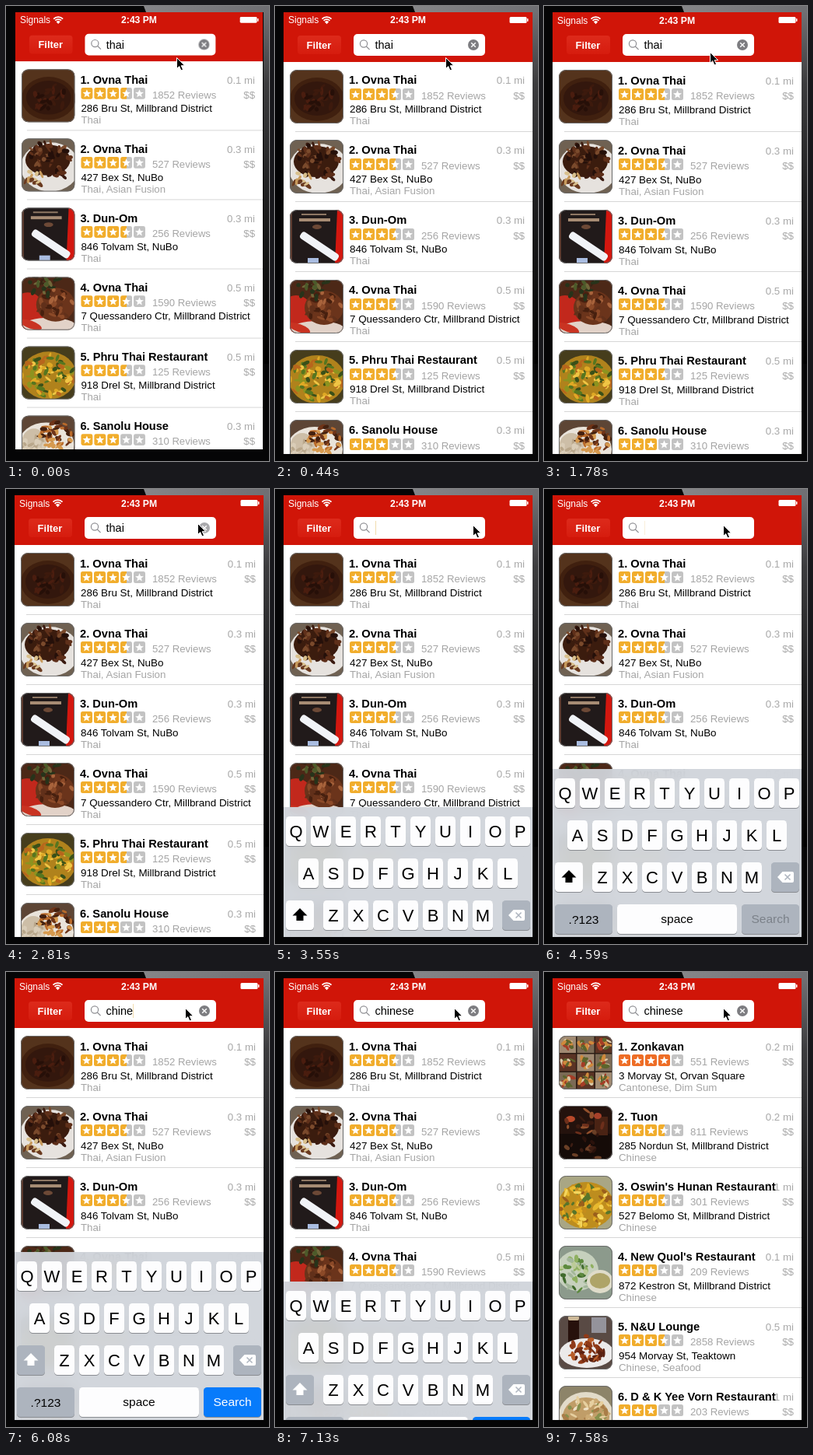
Recreate the animation shown at these times as an HTML page. Size 338 by 585 pixels, loop 8000 ms.

```html
<!DOCTYPE html>
<html lang="en">
<head>
<meta charset="utf-8">
<title>Restaurant search</title>
<style>
html, body { margin: 0; width: 100%; height: 100%; overflow: hidden; background: #000; }
svg { display: block; position: absolute; left: 0; top: 0; }
text, .query { font-family: "Liberation Sans", Arial, sans-serif; }
#stage { position: relative; width: 338px; height: 585px; overflow: hidden; background: #050506; }
#shine {
  position: absolute; inset: 0;
  clip-path: polygon(177px 0, 338px 0, 338px 460px, 331px 460px, 331px 8px, 180px 8px);
  background: linear-gradient(to bottom, transparent 8px, #0007 100px, #000b 250px, #000 460px),
    linear-gradient(to right, #858588 180px, #6f6f73 338px);
}
#screen {
  position: absolute; left: 11px; top: 8px; width: 320px; height: 568px;
  overflow: hidden; background: #fff; transform-origin: 160px 0;
}
#keys {
  position: absolute; left: 0; top: 352px; width: 320px; height: 216px;
  background: rgba(208, 212, 218, .94); backdrop-filter: blur(9px);
}
.query { position: absolute; left: 117.5px; top: 33px; height: 18px; font-size: 14.5px; line-height: 18px; white-space: nowrap; }
#typed i { display: block; overflow: hidden; font-style: normal; }
#typed b { position: absolute; left: 100%; top: 0; width: 1.5px; height: 18px; background: #f1dcae; }
#screen, #keys, #typed, #typed b, #pointer, .old, .new, .word, .clear, .press, .before, .after {
  animation: 8s step-end infinite;
}
#screen { animation-name: zoom; }
#keys { animation-name: slide; }
#typed { animation-name: type; }
#typed b { animation-name: caret; }
#pointer { animation-name: point; }
.old { animation-name: leave; }
.new { animation-name: arrive; }
.word { animation-name: wipe; }
.clear { animation-name: clear; }
.press { animation-name: press; }
.before { animation-name: before; }
.after { animation-name: after; }

@keyframes zoom {
  0% { transform: scale(.99375, .9895); } 1.875% { transform: scale(.996, .993); }
  3.625% { transform: scale(.998, .9965); } 5.5%, 100% { transform: none; }
}
@keyframes slide {
  0% { transform: translateY(216px); } 38.875% { transform: translateY(182px); }
  40.625% { transform: translateY(132px); } 42.5% { transform: translateY(85px); }
  44.375% { transform: translateY(49px); } 46.25% { transform: translateY(30px); }
  48.125% { transform: translateY(18px); } 50% { transform: translateY(10px); }
  51.75% { transform: translateY(5px); } 53.625% { transform: translateY(0); }
  87.25% { transform: translateY(4px); } 89.125% { transform: translateY(38px); }
  91% { transform: translateY(91px); } 92.875% { transform: translateY(152px); }
  94.75%, 100% { transform: translateY(216px); }
}
@keyframes point {
  0% { transform: translate(219px, 66px); } 22.25% { transform: translate(213px, 59px); }
  24.125% { transform: translate(207px, 49px); } 25.875% { transform: translate(209px, 42px); }
  31.5% { transform: translate(222px, 42px); } 33.375% { transform: translate(238px, 43px); }
  35.125% { transform: translate(246px, 44px); } 37% { transform: translate(250px, 45px); }
  38.875% { transform: translate(254px, 46px); } 46.25% { transform: translate(250px, 46px); }
  48.125% { transform: translate(243px, 46px); } 50% { transform: translate(236px, 46px); }
  51.75%, 100% { transform: translate(230px, 46px); }
}
@keyframes type {
  0% { width: 0; } 66.625% { width: .5em; } 70.375% { width: 1.056em; }
  74.125% { width: 1.278em; } 76% { width: 2.39em; } 77.875%, 100% { width: 3.446em; }
}
@keyframes caret {
  0% { opacity: 0; } 37% { opacity: 1; } 57.375% { opacity: .45; }
  62.875% { opacity: 1; } 85.375%, 100% { opacity: 0; }
}
@keyframes leave { 0% { opacity: 1; } 94.75%, 100% { opacity: 0; } }
@keyframes arrive { 0% { opacity: 0; } 94.75%, 100% { opacity: 1; } }
@keyframes wipe { 0% { opacity: 1; } 37%, 100% { opacity: 0; } }
@keyframes clear { 0% { opacity: 1; } 37% { opacity: 0; } 66.625%, 100% { opacity: 1; } }
@keyframes press { 0% { fill: #7d7d81; } 35.125% { fill: #a9a9ac; } 37%, 100% { fill: #7d7d81; } }
@keyframes before { 0% { opacity: 1; } 66.625%, 100% { opacity: 0; } }
@keyframes after { 0% { opacity: 0; } 66.625%, 100% { opacity: 1; } }
</style>
</head>
<body>
<div id="stage">
  <div id="shine"></div>
  <div id="screen">
    <svg id="page" width="320" height="568"></svg>
    <div class="query word">thai</div>
    <div class="query" id="typed"><i>chinese</i><b></b></div>
    <div id="keys"><svg id="board" width="320" height="216"></svg></div>
  </div>
  <svg width="338" height="585">
    <path id="pointer" d="M.5 .5V14.6L3.7 11.6 6 16.9 8.5 15.8 6.2 10.7H10.7Z" fill="#000" stroke="#fff"/>
  </svg>
</div>
<script>
const R = (x, y, w, h, fill, rx = 0, more = '') =>
  `<rect x="${x}" y="${y}" width="${w}" height="${h}" rx="${rx}" fill="${fill}" ${more}/>`;
const E = (x, y, rx, ry, fill, turn = 0) =>
  `<ellipse cx="${x}" cy="${y}" rx="${rx}" ry="${ry}" fill="${fill}" transform="rotate(${turn} ${x} ${y})"/>`;
const T = (x, y, size, str, fill = '#000', more = '') =>
  `<text x="${x}" y="${y}" font-size="${size}" fill="${fill}" ${more}>${str.replace(/&/g, '&amp;')}</text>`;
const P = (d, fill, more = '') => `<path d="${d}" fill="${fill}" ${more}/>`;
const BOLD = 'font-weight="bold"', MID = 'text-anchor="middle"', END = 'text-anchor="end"';

// Scattered food pieces around a centre
function bits(seed, x, y, r, n, ...colors) {
  const rnd = () => (seed = (seed * 16807) % 2147483647) / 2147483647;
  rnd();
  let out = '';
  for (let i = 0; i < n; i++) {
    const a = rnd() * 6.283, d = Math.sqrt(rnd()) * r;
    out += E(x + Math.cos(a) * d, y + Math.sin(a) * d * .8, 2.5 + rnd() * 3.5, 1.2 + rnd() * 1.8,
      colors[i % colors.length], rnd() * 180);
  }
  return out;
}

const photos = {
  stew: R(0, 0, 69, 69, '#54331c') + E(35, 38, 35, 28, '#40200f') +
    E(35, 37, 29, 22, '#33170d') + bits(11, 35, 37, 22, 26, '#4a1d0f', '#260f08', '#3d1a0d'),
  plate: R(0, 0, 69, 69, '#6f6152') + E(37, 37, 38, 32, '#e6e2de') + E(34, 28, 29, 20, '#3b1c0e') +
    bits(7, 34, 27, 28, 44, '#25100a', '#5f301a', '#3d1c0f', '#7a4a2c') +
    bits(5, 17, 51, 13, 12, '#d9c08d', '#6a3a1f', '#c79a5c') + bits(8, 50, 44, 12, 9, '#3a1a10', '#5c2d18'),
  menu: R(0, 0, 69, 69, '#211a1a') + P('M61 0H69V69H58Z', '#d3170f') + R(0, 0, 3, 69, '#5d3b30') +
    R(15, 5, 32, 2, '#8f7864') + R(12, 11, 40, 4, '#a78c74') + E(35, 22, 6, 3, '#6d4936') +
    R(9.5, 42, 57, 10, '#f1f3f7', 4, 'transform="rotate(34 38 47)"') + R(23, 62, 14, 7, '#a9bce0'),
  steak: R(0, 0, 69, 69, '#4c2817') + E(8, 44, 22, 24, '#c2281c') + E(36, 63, 34, 10, '#e2d2c8') +
    E(12, 62, 15, 5, '#c93322', 20) + E(44, 36, 25, 22, '#6b341b') +
    bits(9, 44, 36, 24, 36, '#8c4a28', '#47200f', '#a8633b', '#61301a') +
    bits(4, 27, 9, 22, 24, '#4c5a2a', '#27331a', '#70673a', '#3a2414'),
  curry: R(0, 0, 69, 69, '#463d1c') + E(35, 38, 36, 31, '#b0821c') +
    bits(21, 34, 38, 34, 84, '#dfa925', '#56761f', '#f0c544', '#3a5018', '#b8661c', '#8d931f'),
  rice: R(0, 0, 69, 69, '#5d4535') + E(32, 38, 36, 29, '#e9e3da') + E(16, 36, 16, 19, '#cdbea7') +
    bits(3, 16, 36, 15, 24, '#dacdb8', '#b9a78b') +
    bits(13, 46, 25, 22, 42, '#6f3418', '#b96a2a', '#43200f', '#d69a4f'),
  grid: R(0, 0, 69, 69, '#2b1d15') + [0, 1, 2, 3, 4, 5, 6, 7, 8].map(i => {
    const x = 11 + i % 3 * 23.5, y = 11 + (i / 3 | 0) * 23.5;
    return R(x - 11, y - 11, 22, 22, ['#a08a72', '#5a3324', '#7b6a55'][(i * 2 + (i / 3 | 0)) % 3]) +
      bits(i + 31, x, y, 8, 11, '#a53d26', '#cf8a3c', '#5c642c', '#d9c9a8');
  }).join(''),
  hall: R(0, 0, 69, 69, '#24120d') + R(0, 36, 69, 33, '#150b08') + R(46, 14, 17, 24, '#4a2314') +
    E(15, 17, 6, 4, '#b8492a') + E(50, 13, 5, 4, '#a8412a') + E(33, 25, 3, 2, '#eab15d') +
    bits(17, 35, 30, 32, 14, '#6d2f1b', '#93502c', '#3a1a10') + bits(8, 34, 53, 28, 16, '#3c1d13', '#6a3f26', '#2a120c'),
  noodles: R(0, 0, 69, 69, '#a9a684') + E(35, 38, 36, 30, '#bd8d1e') +
    bits(25, 35, 38, 34, 90, '#e8b92e', '#c58d1c', '#f4d55c', '#58752a', '#9a5f1c', '#e2a91f'),
  greens: R(0, 0, 69, 69, '#8c9a8c') + E(24, 32, 27, 26, '#c6d0bd') +
    bits(6, 21, 37, 27, 46, '#5d8a3e', '#8fb060', '#406a2d', '#bccb98', '#a3b79a') +
    E(53, 46, 17, 15, '#dfdcca') + E(53, 45, 13, 10, '#aea468'),
  wings: R(0, 0, 69, 69, '#594a44') + R(12, 1, 14, 34, '#27110c', 3) + R(12, 0, 14, 6, '#cdb998', 2) +
    R(42, 2, 19, 20, '#94939b') + E(36, 48, 35, 19, '#eceaea') +
    bits(15, 37, 43, 23, 44, '#8f3a18', '#5a2010', '#b75c28', '#732b13'),
  soup: R(0, 0, 69, 69, '#8d8469') + E(35, 38, 35, 30, '#e2dbc9') + E(35, 40, 30, 25, '#c09d68') +
    bits(19, 35, 38, 27, 52, '#e6cf9f', '#a97d48', '#87904d', '#eee1c6', '#cdab74')
};

const thai = [
  ['stew', 'Ovna Thai', 3.5, 1852, '286 Bru St, Millbrand District', 'Thai', .1],
  ['plate', 'Ovna Thai', 3.5, 527, '427 Bex St, NuBo', 'Thai, Asian Fusion', .3],
  ['menu', 'Dun-Om', 3.5, 256, '846 Tolvam St, NuBo', 'Thai', .3],
  ['steak', 'Ovna Thai', 3.5, 1590, '7 Quessandero Ctr, Millbrand District', 'Thai', .5],
  ['curry', 'Phru Thai Restaurant', 3.5, 125, '918 Drel St, Millbrand District', 'Thai', .5],
  ['rice', 'Sanolu House', 3, 310, '', '', .3]
];
const chinese = [
  ['grid', 'Zonkavan', 4, 551, '3 Morvay St, Orvan Square', 'Cantonese, Dim Sum', .2],
  ['hall', 'Tuon', 3.5, 811, '285 Nordun St, Millbrand District', 'Chinese', .2],
  ['noodles', "Oswin's Hunan Restaurant", 3.5, 301, '527 Belomo St, Millbrand District', 'Chinese', .1],
  ['greens', "New Quol's Restaurant", 3, 209, '872 Kestron St, Millbrand District', 'Chinese', .1],
  ['wings', 'N&U Lounge', 3.5, 2858, '954 Morvay St, Teaktown', 'Chinese, Seafood', .5],
  ['soup', 'D & K Yee Vorn Restaurant', 3, 203, '', '', .1]
];

const starPath = 'M' + Array.from({ length: 10 }, (_, i) => {
  const r = i % 2 ? 2.5 : 5.7, a = i * Math.PI / 5;
  return (7.5 + r * Math.sin(a)).toFixed(2) + ' ' + (7.9 - r * Math.cos(a)).toFixed(2);
}).join('L') + 'Z';

const stars = n => [0, 1, 2, 3, 4].map(i => {
  const fill = i + 1 <= n ? (n >= 4 ? '#ee6d26' : '#f1ad2c') : i < n ? 'url(#half)' : '#c3c3c3';
  return `<g transform="translate(${85 + i * 17} 34)">${R(0, 0, 15, 15, fill, 2.5)}${P(starPath, '#fff')}</g>`;
}).join('');

const row = ([pic, name, rate, count, street, kind, miles], i) =>
  `<g transform="translate(0 ${64 + i * 90})">
  <g transform="translate(8 10)"><g clip-path="url(#round)">${photos[pic]}</g>
  ${R(.5, .5, 68, 68, 'none', 9, 'stroke="#6b6b6b"')}</g>` +
  T(310, 28.5, 13.3, miles.toFixed(1) + ' mi', '#a9a9a9', END) + T(310, 48, 13.3, '$$', '#a9a9a9', END) +
  T(84, 28.5, 14.7, `${i + 1}. ${name}`, '#000', BOLD) + stars(rate) +
  T(177, 47.7, 13.2, count + ' Reviews', '#a5a5a5') +
  T(85, 65.5, 13.4, street) + T(85, 80.5, 13.3, kind, '#a5a5a5') +
  R(15, 89, 305, 1, '#d6d6d6') + '</g>';

const list = (rows, cls) => `<g class="${cls}">${R(0, 64, 320, 504, '#fff')}${rows.map(row).join('')}</g>`;

const arc = r => P(`M${55.5 - r * .7} ${14.7 - r * .7}A${r} ${r} 0 0 1 ${55.5 + r * .7} ${14.7 - r * .7}`,
  'none', 'stroke="#fff" stroke-width="1.8"');

document.getElementById('page').innerHTML =
  `<defs><clipPath id="round">${R(0, 0, 69, 69, '#000', 9)}</clipPath>
  <linearGradient id="half"><stop offset=".5" stop-color="#f1ad2c"/><stop offset=".5" stop-color="#c3c3c3"/></linearGradient>
  <linearGradient id="button" x2="0" y2="1"><stop stop-color="#dd2a1b"/><stop offset="1" stop-color="#d61c0e"/></linearGradient></defs>` +
  list(thai, 'old') + list(chinese, 'new') +
  R(0, 0, 320, 64, '#d01508') +
  T(6, 14.5, 12, 'Signals', '#fff') + [8.6, 5.6].map(arc).join('') + P('M55.5 15.2l-2.6-2.8a3.6 3.6 0 0 1 5.2 0z', '#fff') +
  T(160, 14.5, 12.2, '2:43 PM', '#fff', BOLD + ' ' + MID) +
  R(290.5, 6, 22, 8, '#fff', 1.5) + R(313, 8, 1.5, 4, '#fff', .7) +
  R(18, 30, 56, 24, 'url(#button)', 4) + T(45.5, 46.7, 13, 'Filter', '#fff', BOLD + ' ' + MID) +
  R(90, 28, 169, 28, '#fff', 5) +
  '<g fill="none" stroke="#8e8e93" stroke-width="1.2"><circle cx="103" cy="40.5" r="4.6"/><path d="M106.4 44l4.2 4.2"/></g>' +
  '<g class="clear"><circle class="press" cx="244" cy="42" r="7" fill="#7d7d81"/>' +
  P('M241.2 39.2l5.6 5.6m0-5.6l-5.6 5.6', 'none', 'stroke="#fff" stroke-width="1.4"') + '</g>';

const key = (x, y, w, fill = '#fdfdfe') => R(x, y + 1, w, 38, '#898c91', 4.5) + R(x, y, w, 38, fill, 4.5);
const letters = (str, x, y) => [...str].map((c, i) =>
  key(x + i * 32, y, 26) + T(x + 13 + i * 32, y + 27, 22, c, '#000', MID)).join('');
const grey = '#adb4be';
const arrow = fill => P('M21 130l9.5 9.5h-5v6.5h-9v-6.5h-5z', fill);
const group = (cls, inner) => `<g class="${cls}">${inner}</g>`;
const search = (bg, fill) => key(243, 174, 74, bg) + T(280, 198, 15.5, 'Search', fill, MID);

document.getElementById('board').innerHTML =
  letters('QWERTYUIOP', 3, 12) + letters('ASDFGHJKL', 19, 66) + letters('ZXCVBNM', 51, 120) +
  group('before', key(3, 120, 36) + arrow('#000') + search(grey, '#7b8189')) +
  group('after', key(3, 120, 36, grey) + arrow('#fff') + search('#077bfb', '#fff')) +
  key(281, 120, 36, grey) + P('M289 139l6.5-7h12.5q2 0 2 2v10q0 2-2 2h-12.5z', '#fff') +
  P('M298.5 135.5l7 7m0-7l-7 7', 'none', `stroke="${grey}" stroke-width="1.5"`) +
  key(3, 174, 74, grey) + T(40, 198.5, 15.5, '.?123', '#000', MID) +
  key(83, 174, 154) + T(160, 197.5, 15.5, 'space', '#000', MID);
</script>
</body>
</html>
```
